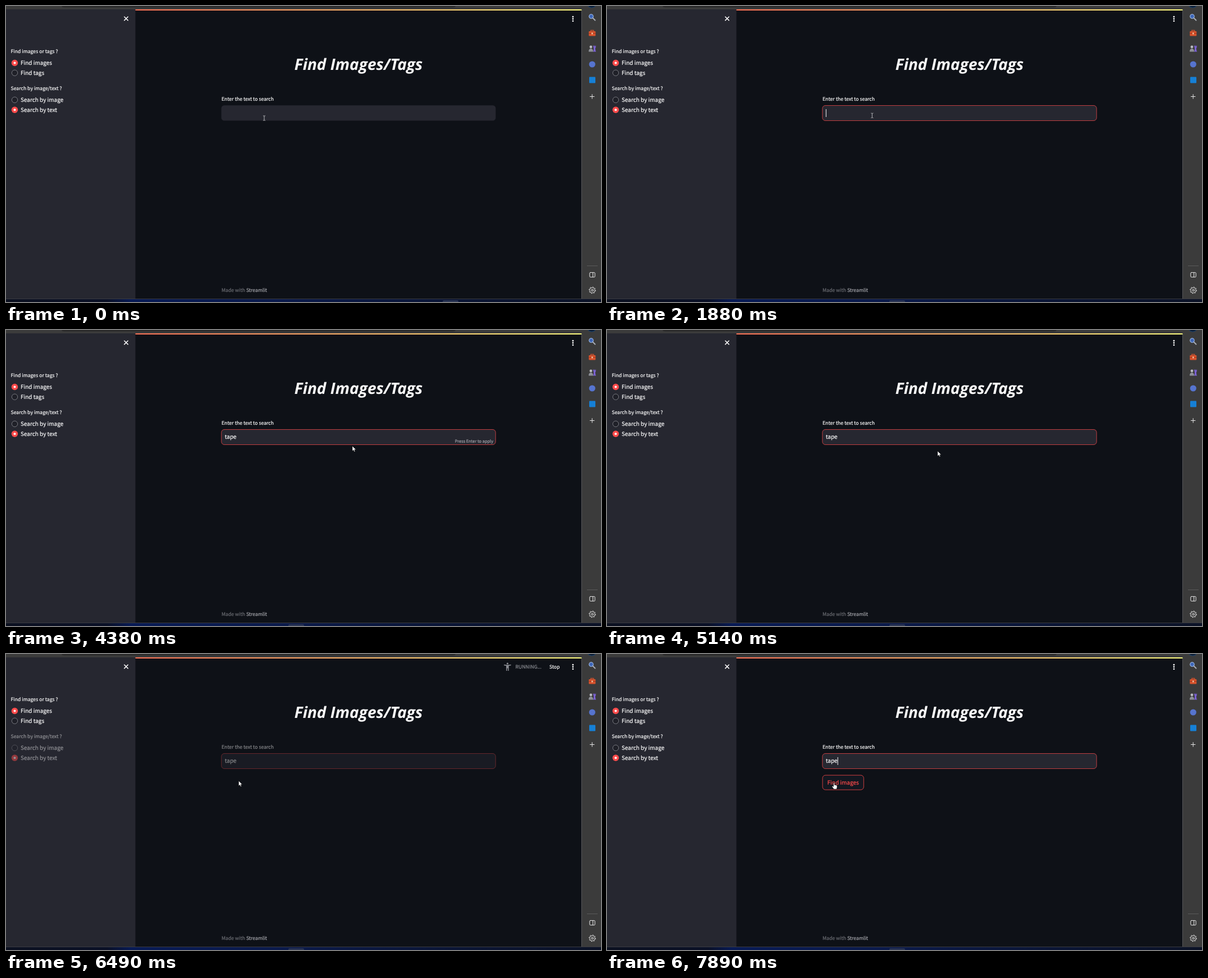
Recreate the animation shown at these times as an HTML page. Size 1060 by 528 pixels, loop 8000 ms.

```html
<!DOCTYPE html>
<html lang="en">
<head>
<meta charset="utf-8">
<title>Find Images/Tags</title>
<style>
  html, body { margin: 0; width: 100%; height: 100%; overflow: hidden; background: #0e1117; }
  svg { display: block; width: 1060px; height: 528px; color: #fafafa; }
  text {
    font-family: "Noto Sans CJK SC", "Noto Sans CJK JP", "Noto Sans CJK", "Open Sans", sans-serif;
    font-size: 9.98px; fill: currentColor; stroke: currentColor; stroke-width: .2; white-space: pre;
    text-rendering: geometricPrecision;
  }
  .small { font-size: 8.68px; }
  .tiny { font-size: 7.4px; color: #a0a1a8; }
  .title { font: italic 700 28px "Open Sans", "Noto Sans", sans-serif; text-anchor: middle; stroke: none; }
  .line { fill: none; stroke: #e8e8e8; stroke-width: 1; stroke-linecap: round; stroke-linejoin: round; }
  .bold { stroke: #fff; stroke-width: 1.5; }
</style>
</head>
<body>
<svg viewBox="0 0 1060 528" xmlns="http://www.w3.org/2000/svg">
  <defs>
    <linearGradient id="deco" gradientUnits="userSpaceOnUse" x1="0" x2="1025"><stop stop-color="#ff4b4b"/><stop offset="1" stop-color="#fffd80"/></linearGradient>
    <linearGradient id="bar">
      <stop stop-color="#0b1020"/><stop offset=".17" stop-color="#0a1026"/><stop offset=".21" stop-color="#071a55"/>
      <stop offset=".45" stop-color="#0a1a4c"/><stop offset=".75" stop-color="#0a1535"/><stop offset="1" stop-color="#0b1226"/>
    </linearGradient>
    <g id="on"><circle r="5.7" fill="#ff4b4b"/><circle r="2" fill="#fff"/></g>
    <g id="off"><circle r="5.2" fill="#1f2028" stroke="#7b7c83"/></g>
  </defs>

  <!-- browser frame -->
  <rect width="1060" height="528" fill="#3b3b3b"/>
  <path d="M99 0H801Q800 2.5 796 2.5H104Q100 2.5 99 0Z" fill="#292929"/>
  <rect y="6" width="231" height="517" fill="#262730"/>
  <rect x="230.5" y="6" width="795" height="517" fill="#0e1117"/>
  <rect x="230.5" y="6" width="795" height="2" fill="url(#deco)"/>
  <rect x="1025" y="8" width="1" height="515" fill="#55565a"/>
  <rect y="522" width="1060" height="1" fill="#3a3b42"/>
  <rect y="523" width="1060" height="5" fill="url(#bar)"/>
  <rect id="pill" y="525" width="28" height="6" rx="2" fill="#2a3554"/>

  <!-- left panel -->
  <path class="line bold" d="M210.8 19.2l6.4 6.4m0-6.4l-6.4 6.4"/>
  <text class="small" x="8.5" y="84">Find images or tags ?</text>
  <use href="#on" x="15.5" y="101.5"/><text x="26" y="105.3">Find images</text>
  <use href="#off" x="15.5" y="119.3"/><text x="26" y="123.2">Find tags</text>
  <g class="stale">
    <text class="small" x="8.5" y="150">Search by image/text ?</text>
    <use href="#off" x="15.5" y="167.5"/><text x="26" y="171.3">Search by image</text>
    <use href="#on" x="15.5" y="185.3"/><text x="26" y="189.2">Search by text</text>
  </g>

  <!-- main page -->
  <g fill="#fafafa"><circle cx="1010" cy="19.2" r="1.4"/><circle cx="1010" cy="23" r="1.4"/><circle cx="1010" cy="26.8" r="1.4"/></g>
  <text class="title" x="628" y="114">Find Images/Tags</text>
  <g class="stale">
    <text class="small" x="384" y="169">Enter the text to search</text>
    <rect x="383.6" y="177.3" width="488.8" height="27.3" rx="5.2" fill="#262730"/>
    <rect id="focus" x="383.8" y="177.5" width="488.4" height="27" rx="5.2" fill="none" stroke="#ff4b4b" stroke-width=".72"/>
    <text id="typed" x="389.8" y="194.4"></text>
    <rect id="caret" y="184" width="1" height="14" fill="#fafafa"/>
    <text id="hint" class="tiny" x="868" y="201" text-anchor="end">Press Enter to apply</text>
  </g>
  <g id="button" color="#ff4b4b">
    <rect x="384" y="216.2" width="73.3" height="26" rx="5.2" fill="#131720" stroke="currentColor" stroke-width=".8"/>
    <text x="392.6" y="233">Find images</text>
  </g>
  <text class="small" x="384" y="510.2" color="#6a6c72">Made with <tspan color="#a3a4aa" fill="currentColor" stroke="currentColor">Streamlit</tspan></text>

  <g id="running" color="#8b8d93">
    <g id="swim" fill="none" stroke="currentColor" stroke-width="1.6">
      <path d="M888.5 17.5l4-.9 4 4.6-6.5 2.6M892.5 20.5l-3.5 3"/>
      <circle cx="898.2" cy="19.7" r="1.2"/>
      <path d="M886.5 25.7q1.8-1.5 3.6 0t3.6 0 3.6 0 3.6 0M886.5 28.9q1.8-1.5 3.6 0t3.6 0 3.6 0 3.6 0" stroke-width="1.3"/>
    </g>
    <g id="stand" fill="currentColor">
      <circle cx="893.4" cy="17" r="1.6"/>
      <path d="M887.3 18.7q6.1 1.6 12.2 0l.3 1.5q-2.2.6-4.1.8V30h-1.5v-4.4h-1.6V30h-1.5V21q-2-.2-4.1-.8z"/>
    </g>
    <text class="small" x="907.6" y="26">RUNNING...</text>
    <text class="small" x="968" y="25.6" color="#fafafa">Stop</text>
  </g>

  <!-- right toolbar -->
  <circle cx="1043.5" cy="-6" r="9" fill="#0b1c33" stroke="#1a4574"/>
  <path d="M1045.5 21.5l4 4" stroke="#a8acb5" stroke-width="1.9" stroke-linecap="round"/>
  <circle cx="1042.5" cy="18.5" r="3.7" fill="#3d66b8" stroke="#a9c4ee" stroke-width="1.1"/>
  <path d="M1041.8 45.5v-2h5v2" fill="none" stroke="#c8512f" stroke-width="1.3"/>
  <rect x="1038.3" y="45" width="12" height="8.4" rx="1.2" fill="#d9532c"/>
  <path d="M1038.3 48.8h12" stroke="#8f2f1b"/>
  <rect x="1043.1" y="47.6" width="2.4" height="2.8" fill="#f3c9a8"/>
  <circle cx="1042" cy="73" r="2.4" fill="#b8bac0"/><path d="M1038 81.5q0-5.5 4-5.5t4 5.5z" fill="#8d9098"/>
  <path d="M1045.6 70.5h1.2v1.2h1v-1.2h1.3v1.2h1v-1.2h.7v3.6l-1 .8.4 4.3 1 2.3h-5.4l1-2.3.2-4.3-.4-.8z" fill="#7b62d3"/>
  <circle cx="1044.3" cy="104" r="5.6" fill="#5674cf"/>
  <rect x="1039" y="126.6" width="11" height="11" rx="1" fill="#1680d6"/>
  <path class="line" d="M1040.4 161.5h7.6M1044.2 157.7v7.6"/>
  <path d="M1035 463.5h19" stroke="#5b5b5b"/>
  <rect class="line" x="1039.8" y="475.4" width="9.4" height="8.2" rx="1.4"/><path class="line" d="M1045.6 475.4v8.2"/>
  <path id="gear" class="line"/><circle class="line" cx="1044.5" cy="507" r="1.7"/>

  <!-- pointers, hotspot at 0,0 -->
  <path id="beam" d="M-2-4.2q1.6 0 2 .8q.4-.8 2-.8M0-3.5v7M-2 4.2q1.6 0 2-.8q.4.8 2 .8" fill="none" stroke="#c9c9cc" stroke-width=".9"/>
  <path id="arrow" d="M0 0v9l2.1-1.9 1.4 3.1 1.5-.7-1.4-3h2.9z" fill="#fff" stroke="#000" stroke-width=".5"/>
  <path id="hand" d="M0 .8Q.9-.4 1.7.8V4.2Q2.6 3.4 3.3 4.4 4.2 3.7 4.9 4.7 6.2 4.2 6.4 5.6V8.3Q6.2 10 5.3 11.6H.7Q-.8 9.6-2.5 7.2-2.6 5.7-1.3 6.1L0 7.2Z" fill="#fff" stroke="#111" stroke-width=".6"/>
</svg>
<script>
const LOOP = 8000;
const $ = id => document.getElementById(id);
const typed = $("typed"), caret = $("caret");
const stale = document.querySelectorAll(".stale");

// rows: time, x, y
const PATH = [
  [190, 460, 200], [460, 470, 192.5], [660, 471, 192.5], [790, 473, 193],
  [1740, 473, 193], [1950, 472, 196.5], [2550, 472, 196.5], [2750, 472, 201],
  [3230, 469, 211], [4030, 469, 211], [4380, 617, 207], [4450, 619, 208],
  [4720, 613, 213], [5070, 613, 213], [5560, 447, 233], [5900, 447, 233],
  [6700, 403, 224], [7500, 403, 224], [7820, 403.5, 229.5]
];
const KEYS = [[2150, "t"], [2550, "ta"], [3090, "tap"], [3570, "tape"]];
const CARET_ON = [[660, 1260], [1740, 4030], [4520, 5070], [5739, 6229], [6719, 7209], [7699, LOOP]];

const ramp = (t, a, b) => Math.min(1, Math.max(0, (t - a) / (b - a)));
const show = (el, v) => { el.style.opacity = Number(v); };
const between = (t, a, b) => t >= a && t < b;

function pointAt(t) {
  const i = PATH.findIndex(p => p[0] > t);
  if (i === 0) return PATH[0].slice(1);
  if (i < 0) return PATH[PATH.length - 1].slice(1);
  const [a, b] = [PATH[i - 1], PATH[i]], k = ramp(t, a[0], b[0]);
  return [1, 2].map(n => a[n] + (b[n] - a[n]) * k);
}

function gearPath() {
  const pts = [];
  for (let i = 0; i < 32; i++) {
    const r = i % 4 < 2 ? 5.8 : 4.2, a = (i + 0.5) * Math.PI / 16;
    pts.push((1044.5 + r * Math.cos(a)).toFixed(2) + " " + (507 + r * Math.sin(a)).toFixed(2));
  }
  return "M" + pts.join("L") + "Z";
}

function draw(t) {
  const word = KEYS.reduce((w, k) => t >= k[0] ? k[1] : w, "");
  if (typed.textContent !== word) typed.textContent = word;
  caret.setAttribute("x", 389.8 + (word ? typed.getComputedTextLength() : 0));
  show(caret, CARET_ON.some(([a, b]) => between(t, a, b)));
  show($("focus"), ramp(t, 600, 790));
  show($("hint"), between(t, 2150, 5140));

  const dim = t < 7430 ? 1 - 0.65 * ramp(t, 5760, 6700) : 1;
  stale.forEach(el => show(el, dim));
  show($("button"), t >= 7430);

  show($("running"), ramp(t, 5300, 5500) * (1 - ramp(t, 7500, 7720)));
  const swim = Math.floor((t - 5400) / 230) % 2 !== 0;
  show($("swim"), swim);
  show($("stand"), !swim);

  show($("pill"), t < 390 || t >= 660);
  $("pill").setAttribute("x", t < 500 ? 778 : 503);

  const [x, y] = pointAt(t);
  const kind = t >= 7430 ? "hand" : y > 205 ? "arrow" : "beam";
  for (const id of ["beam", "arrow", "hand"]) {
    $(id).setAttribute("transform", `translate(${x} ${y})`);
    show($(id), id === kind);
  }
}

$("gear").setAttribute("d", gearPath());
const start = performance.now();
function tick() {
  draw((performance.now() - start) % LOOP);
  requestAnimationFrame(tick);
}
tick();
</script>
</body>
</html>
```
